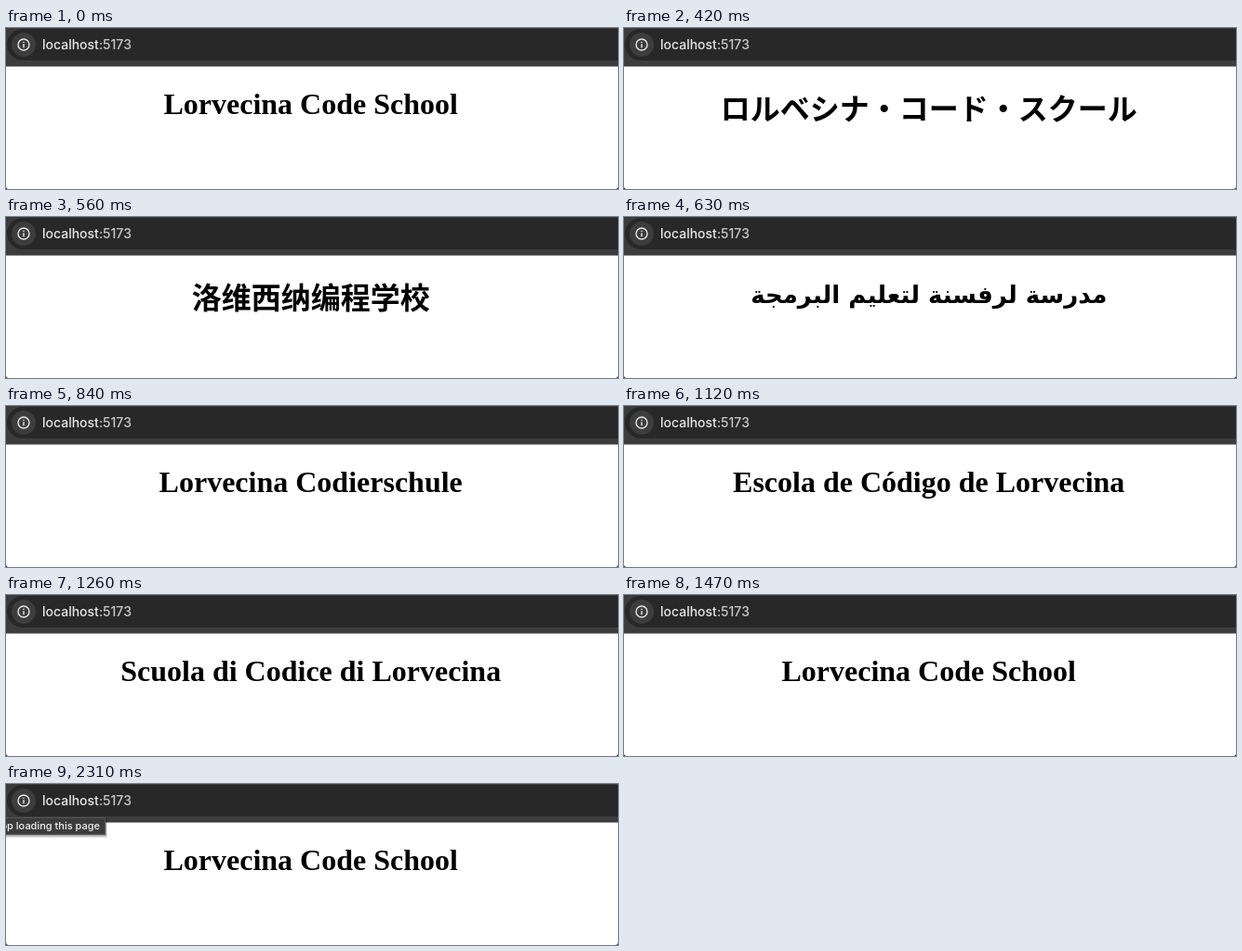
Write an HTML page that moves like this. It is 658x174 px and loops after 2870 ms.

```html
<!DOCTYPE html>
<html lang="en">
<head>
<meta charset="utf-8">
<title>Heading in many languages</title>
<style>
  html, body { margin: 0; width: 100%; height: 100%; overflow: hidden; background: #fff; }
  svg { display: block; width: 658px; height: 174px; }
  .ui { font-family: Inter, Roboto, sans-serif; font-weight: 500; }
  .serif { font-family: "Liberation Serif", "Noto Serif", serif; font-size: 32px; }
  .cjk { font-family: "Noto Sans CJK JP", "Noto Sans CJK", sans-serif; font-size: 32px; }
  .arabic { font-family: "DejaVu Sans", sans-serif; font-size: 26px; }
  #heading { font-weight: 700; text-anchor: middle; }
</style>
</head>
<body>
<svg viewBox="0 0 658 174" xmlns="http://www.w3.org/2000/svg">
  <rect width="658" height="174" fill="#fff"/>

  <!-- address bar, running off the right edge -->
  <rect width="658" height="41.6" fill="#3c3c3c"/>
  <rect x="1" y="1" width="700" height="34" rx="17" fill="#282828"/>
  <circle cx="19" cy="18" r="13" fill="#3d3d3d"/>
  <g fill="none" stroke="#e8e8e8" stroke-width="1.4">
    <circle cx="19" cy="18" r="6"/>
    <path d="M19 17.3V21.2M19 14.7V16.1"/>
  </g>
  <text class="ui" x="39" y="23" font-size="14" fill="#e8e8e8">localhost<tspan fill="#c9c9c9">:5173</tspan></text>

  <text id="heading" x="327.7" y="93" fill="#000"></text>

  <g id="tip">
    <rect x="-4" y="38" width="113" height="20" rx="1" fill="#000" opacity=".12"/>
    <rect x="-4" y="37" width="112" height="19.5" rx="1" fill="#000" opacity=".25"/>
    <rect x="-4" y="36.5" width="110.5" height="18" fill="#3c3c3c" stroke="#555"/>
    <text class="ui" x="101" y="49" font-size="11" text-anchor="end" fill="#f2f2f2">Stop loading this page</text>
  </g>

  <!-- rounded window corners -->
  <path d="M0 171Q0 174 3 174H0ZM658 171Q658 174 655 174H658Z" fill="#333"/>
</svg>
<script>
  const LOOP = 2870;
  const TIP_START = 2310;
  const BASELINE = { serif: 93, cjk: 99, arabic: 93 };

  // start time, text, script style
  const titles = [
    [0, "Lorvecina Code School", "serif"],
    [420, "ロルベシナ・コード・スクール", "cjk"],
    [560, "洛维西纳编程学校", "cjk"],
    [630, "مدرسة لرفسنة لتعليم البرمجة", "arabic"],
    [770, "École de Code de Lorvecine", "serif"],
    [840, "Lorvecina Codierschule", "serif"],
    [980, "Escuela de Código de Lorvecina", "serif"],
    [1050, "Escola de Codi de Lorvecina", "serif"],
    [1120, "Escola de Código de Lorvecina", "serif"],
    [1190, "Lorvecina Codeerschool", "serif"],
    [1260, "Scuola di Codice di Lorvecina", "serif"],
    [1400, "Лорвесинская Школа Кода", "serif"],
    [1470, "Lorvecina Code School", "serif"]
  ];

  const heading = document.getElementById("heading");
  const tip = document.getElementById("tip");
  let shown = null;

  function draw(t) {
    const title = titles.findLast(([start]) => start <= t);
    if (title !== shown) {
      const [, text, style] = shown = title;
      heading.textContent = text;
      heading.setAttribute("class", style);
      heading.setAttribute("y", BASELINE[style]);
    }
    tip.setAttribute("visibility", t >= TIP_START ? "visible" : "hidden");
  }

  const origin = performance.now();
  function tick() {
    draw((performance.now() - origin) % LOOP);
    requestAnimationFrame(tick);
  }
  tick();
</script>
</body>
</html>
```
